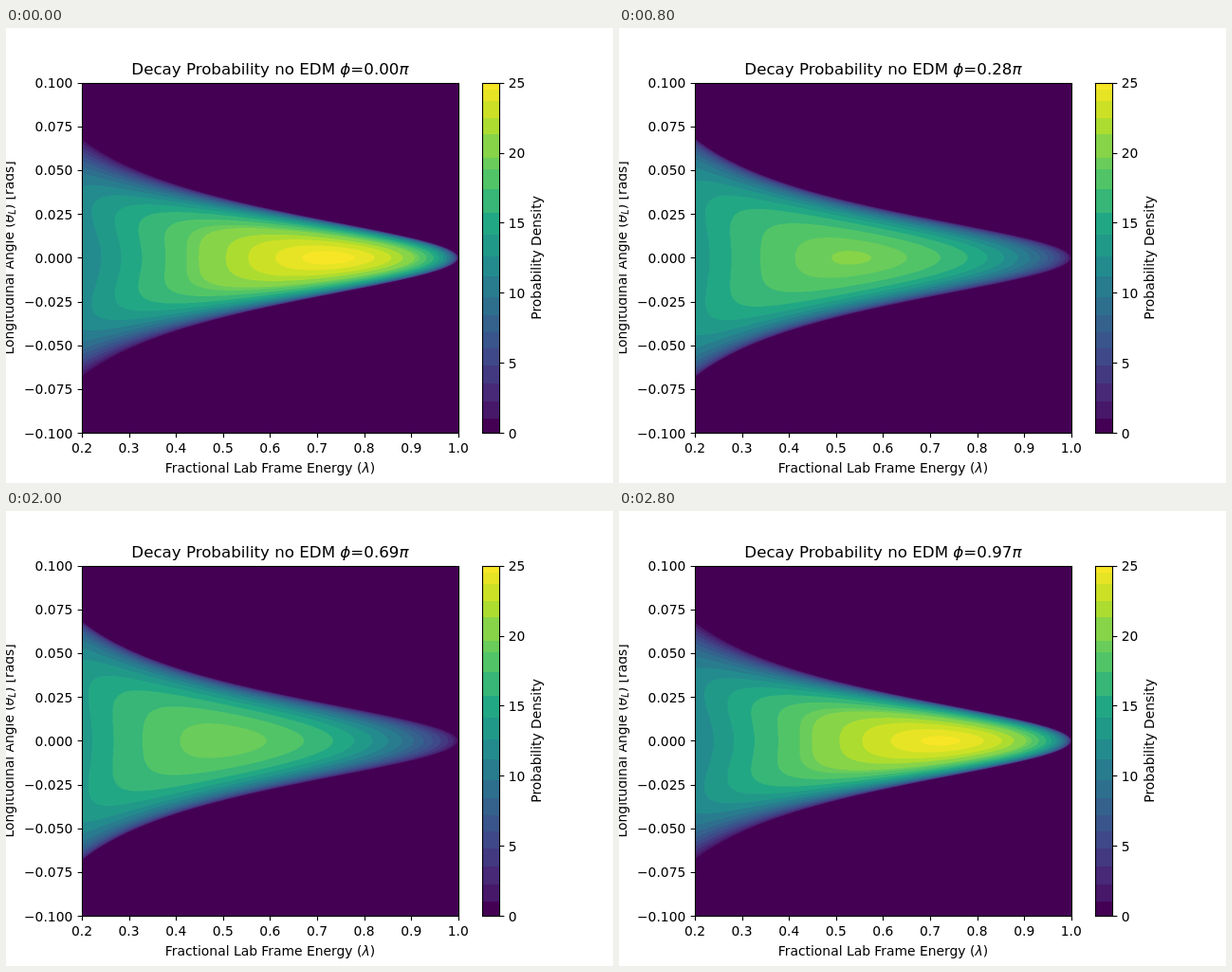
An HTML page with a canvas that plays this animation: 640x480 px, repeating every 2900 ms.

```html
<!DOCTYPE html>
<html lang="en">
<head>
<meta charset="utf-8">
<title>Decay Probability</title>
<style>
  html, body { margin: 0; width: 100%; height: 100%; overflow: hidden; background: #fff; }
  #stage { position: relative; width: 640px; height: 480px; overflow: hidden; }
  canvas { position: absolute; left: 80px; top: 58px; }
  svg { position: absolute; left: 0; top: 0; }
  text { font: 13.89px "DejaVu Sans", sans-serif; text-anchor: middle; white-space: pre; }
  .title { font-size: 16.67px; }
  .end { text-anchor: end; }
  .start { text-anchor: start; }
  .i { font-style: italic; }
  .sub { font-size: 9.72px; }
  .line { fill: none; stroke: #000; stroke-width: 1.11; }
</style>
</head>
<body>
<div id="stage">
  <canvas id="plot" width="398" height="370"></canvas>
  <svg width="640" height="480" viewBox="0 0 640 480">
    <g id="bar" shape-rendering="crispEdges"></g>
    <g id="ticks"></g>
    <rect class="line" x="80.5" y="58.5" width="397" height="369"/>
    <rect class="line" x="502.5" y="58.5" width="18" height="369"/>
    <text class="title" x="278.4" y="49">Decay Probability no EDM <tspan class="i">ϕ</tspan>=<tspan id="phi">0.00</tspan><tspan class="i">π</tspan></text>
    <text x="278.4" y="469">Fractional Lab Frame Energy (<tspan class="i">λ</tspan>)</text>
    <text transform="translate(8 242.4) rotate(-90)">Longitudinal Angle (<tspan class="i">θ</tspan><tspan class="i sub" dy="2.2">L</tspan><tspan dy="-2.2">) [rads]</tspan></text>
    <text transform="translate(563.7 242.4) rotate(-90)">Probability Density</text>
  </svg>
</div>
<script>
const GAMMA = 29.3, STEPS = 29, STEP_MS = 100, MAX = 25;
const LEFT = 80, TOP = 57.6, WIDTH = 396.8, HEIGHT = 369.6;
const LEVELS = [0, 1, 2.27, 3.55, 4.8, 6, 7.2, 8.4, 9.7, 11.15, 12.6, 14.15, 15.7,
  17.4, 18.85, 19.65, 21.3, 22.5, 23.7, 24.5, MAX];
const VIRIDIS = [0x440154, 0x482475, 0x414487, 0x355f8d, 0x2a788e, 0x21918c,
  0x22a884, 0x44bf70, 0x7ad151, 0xbddf26, 0xfde725];

const $ = id => document.getElementById(id);
const snap = v => Math.floor(v + 0.5) + 0.5;
const signed = (v, digits) => v.toFixed(digits).replace("-", "\u2212");

function add(parent, tag, attrs, label) {
  const el = document.createElementNS("http://www.w3.org/2000/svg", tag);
  for (const key in attrs) el.setAttribute(key, attrs[key]);
  if (label !== undefined) el.textContent = label;
  $(parent).appendChild(el);
}

function viridis(t) {
  const k = Math.min(9, Math.floor(t * 10)), f = t * 10 - k;
  return [16, 8, 0].map(s => {
    const a = VIRIDIS[k] >> s & 255, b = VIRIDIS[k + 1] >> s & 255;
    return Math.round(a + (b - a) * f);
  });
}

const bands = LEVELS.slice(1).map((hi, k) => viridis(k ? (LEVELS[k] + hi) / 2 / MAX : 0));

// Density value (in 1/20 units) to band index
const bandOf = new Uint8Array(MAX * 20 + 1);
for (let i = 0, k = 0; i < bandOf.length; i++) {
  while (k < bands.length - 1 && i / 20 >= LEVELS[k + 1] - 1e-9) k++;
  bandOf[i] = k;
}

function drawAxes() {
  const barY = v => TOP + HEIGHT * (1 - v / MAX);
  bands.forEach((c, k) => {
    const y = barY(LEVELS[k + 1]);
    add("bar", "rect", { x: 502, y, width: 18, height: barY(LEVELS[k]) - y, fill: `rgb(${c})` });
  });
  for (let i = 0; i <= 8; i++) {
    const x = LEFT + WIDTH * i / 8, y = TOP + HEIGHT * i / 8;
    add("ticks", "path", { class: "line", d: `M${snap(x)} 427.5v4.86M80.5 ${snap(y)}h-4.86` });
    add("ticks", "text", { x, y: 448 }, (0.2 + i / 10).toFixed(1));
    add("ticks", "text", { class: "end", x: 70.3, y: y + 5.3 }, signed(0.1 - i / 40, 3));
  }
  for (let v = 0; v <= MAX; v += 5) {
    add("ticks", "path", { class: "line", d: `M520.5 ${snap(barY(v))}h4.86` });
    add("ticks", "text", { class: "start", x: 529.8, y: barY(v) + 5.3 }, v);
  }
}

// Boosted muon decay spectrum, integrated over the other transverse angle.
// q = 1 + (gamma * theta)^2, a = spin projection on the momentum
function density(lam, q, a) {
  const v2 = 1 / lam - q;
  if (v2 <= 0) return 0;
  const w1 = q + v2 / 3;
  const w2 = q * q + 2 * q * v2 / 3 + v2 * v2 / 5;
  const sum = -2 * a + (3 + a * (4 * lam + 1)) * w1 - 2 * lam * (1 + a) * w2;
  return 4 * GAMMA / Math.PI * lam * lam * Math.sqrt(v2) * sum;
}

const ctx = $("plot").getContext("2d");
const img = ctx.createImageData(398, 370);
const SUB = [0.25, 0.75];

function drawPlot(a) {
  const { data, width, height } = img;
  for (let j = 0, p = 0; j < height; j++) {
    const qs = SUB.map(s => {
      const u = GAMMA * (0.1 - 0.2 * (58 + j + s - TOP) / HEIGHT);
      return 1 + u * u;
    });
    for (let i = 0; i < width; i++, p += 4) {
      let r = 0, g = 0, b = 0;
      for (const s of SUB) {
        const lam = Math.min(1, 0.2 + 0.8 * (i + s) / WIDTH);
        for (const q of qs) {
          const d = Math.max(0, Math.min(MAX, density(lam, q, a)));
          const c = bands[bandOf[d * 20 | 0]];
          r += c[0]; g += c[1]; b += c[2];
        }
      }
      data[p] = r / 4; data[p + 1] = g / 4; data[p + 2] = b / 4; data[p + 3] = 255;
    }
  }
  ctx.putImageData(img, 0, 0);
}

let shown = -1;
function show(step) {
  if (step === shown) return;
  shown = step;
  const phi = step / STEPS;
  $("phi").textContent = phi.toFixed(2);
  drawPlot(Math.cos(2 * Math.PI * phi));
}

function tick(now) {
  show(Math.floor(Math.max(0, now) / STEP_MS) % STEPS);
  requestAnimationFrame(tick);
}

drawAxes();
show(0);
requestAnimationFrame(tick);
</script>
</body>
</html>
```
